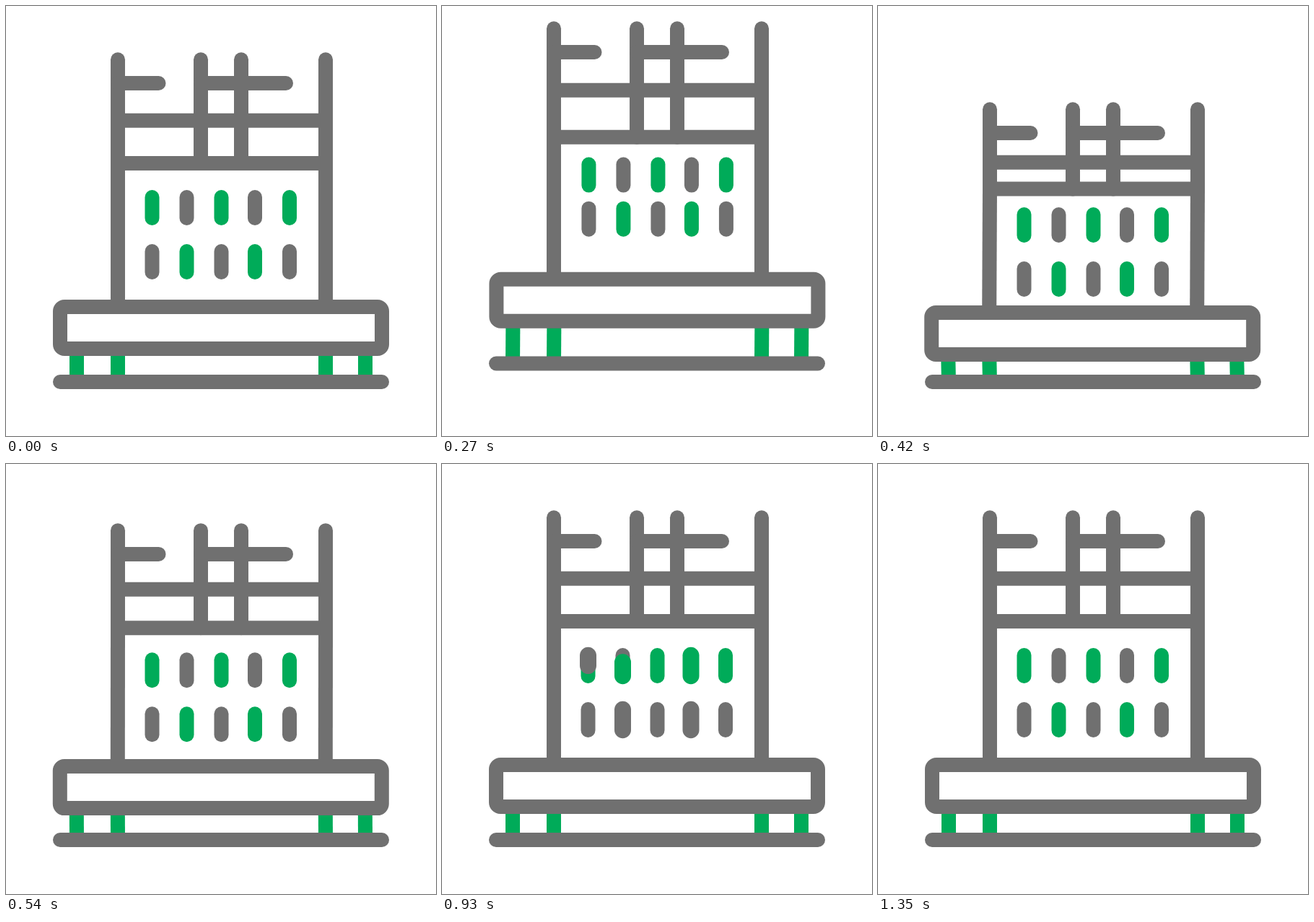
Recreate the animation shown at these times as an HTML page with a canvas. Size 596x596 px, loop 1.5 s.

```html
<!DOCTYPE html>
<html lang="en">
<head>
<meta charset="utf-8">
<title>Loom</title>
<style>
  html, body { margin: 0; width: 100%; height: 100%; overflow: hidden; background: #fff; }
  canvas { display: block; width: 596px; height: 596px; }
</style>
</head>
<body>
<canvas id="stage" width="596" height="596"></canvas>
<script>
const ctx = document.getElementById('stage').getContext('2d');
const GRAY = '#707070', GREEN = '#00ab59';
const LOOP = 1500, STEP = 30;
const COLUMNS = [202.5, 250.5, 298.5, 345, 393];
const ODD = [4, 2, 0], EVEN = [3, 1];

// Each strand is drawn pill by pill, then erased in the same order.
const STRANDS = [
  { row: 0, cols: ODD, color: GRAY, show: [600, 780], hide: [780, 960] },
  { row: 0, cols: EVEN, color: GREEN, show: [780, 960], hide: [960, 1140] },
  { row: 1, cols: EVEN, color: GRAY, show: [750, 930], hide: [930, 1113] },
  { row: 1, cols: ODD, color: GREEN, show: [930, 1110], hide: [1170, 1350] }
];

const clamp = v => Math.min(1, Math.max(0, v));
const progress = (t, [from, to]) => clamp((t - from) / (to - from));
const ease = p => p * p * (3 - 2 * p);

// Moves from 0 to the peak, to the dip and back to 0.
function bounce(t, peak, dip) {
  const up = ease(progress(t, [60, 240]));
  const down = ease(progress(t, [240, 420]));
  const back = ease(progress(t, [420, 600]));
  return peak * up + (dip - peak) * down - dip * back;
}

function line(x1, y1, x2, y2, color = GRAY, cap = 'butt', width = 20) {
  ctx.strokeStyle = color;
  ctx.lineCap = cap;
  ctx.lineWidth = width;
  ctx.beginPath();
  ctx.moveTo(x1, y1);
  ctx.lineTo(x2, y2);
  ctx.stroke();
}

function drawFrame(top, bars, trayY, trayDx) {
  const [bar1, bar2, bar3] = bars;
  for (const x of [155, 443]) {
    line(x, top, x, bar3, GRAY, 'round');
    line(x, bar3, x + Math.min(0, trayDx), trayY + 10);
  }
  for (const x of [270, 326]) line(x, top, x, bar3, GRAY, 'round');
  line(155, bar1, 211.5, bar1, GRAY, 'round');
  line(270, bar1, 388, bar1, GRAY, 'round');
  line(155, bar2, 443, bar2);
  line(155, bar3, 443, bar3);
}

function drawStand(trayY, trayDx, baseY) {
  for (const x of [98, 155, 443, 498]) {
    line(x + trayDx, trayY + 68, x, baseY, GREEN);
  }
  ctx.strokeStyle = GRAY;
  ctx.lineWidth = 20;
  ctx.beginPath();
  ctx.roundRect(75 + trayDx, trayY + 10, 446, 58, 6);
  ctx.stroke();
  line(75, baseY, 521, baseY, GRAY, 'round');
}

function drawPills(t, rowY, dx) {
  rowY.forEach((y, row) => COLUMNS.forEach((x, col) => {
    const color = (row + col) % 2 ? GRAY : GREEN;
    line(x + dx, y - 14.5, x + dx, y + 14.5, color, 'round');
  }));
  for (const { row, cols, color, show, hide } of STRANDS) {
    const head = progress(t, show) * cols.length;
    const tail = progress(t, hide) * cols.length;
    cols.forEach((col, i) => {
      const from = clamp(tail - i), to = clamp(head - i);
      if (to <= from) return;
      const bottom = rowY[row] + 14.2;
      line(COLUMNS[col], bottom - 28.4 * from, COLUMNS[col], bottom - 28.4 * to, color, 'round', 23);
    });
  }
}

function draw(t) {
  ctx.fillStyle = '#fff';
  ctx.fillRect(0, 0, 596, 596);
  const top = bounce(t, -52, 69);
  const bars = [107 + top, 158.7 + bounce(t, -50, 58), 218 + bounce(t, -42, 35.5)];
  const trayY = 407 + bounce(t, -42, 8);
  const trayDx = bounce(t, 0.5, -0.8);
  const rowY = [279.5 + bounce(t, -51, 24), 354.5 + bounce(t, -66, 24)];
  drawFrame(74.3 + top, bars, trayY, trayDx);
  drawStand(trayY, trayDx, 521 + bounce(t, -27.5, 0));
  drawPills(t, rowY, bounce(t, 1, 0));
}

const start = performance.now();
function tick() {
  const t = (performance.now() - start) % LOOP;
  draw(Math.floor(t / STEP) * STEP);
  requestAnimationFrame(tick);
}
tick();
</script>
</body>
</html>
```
